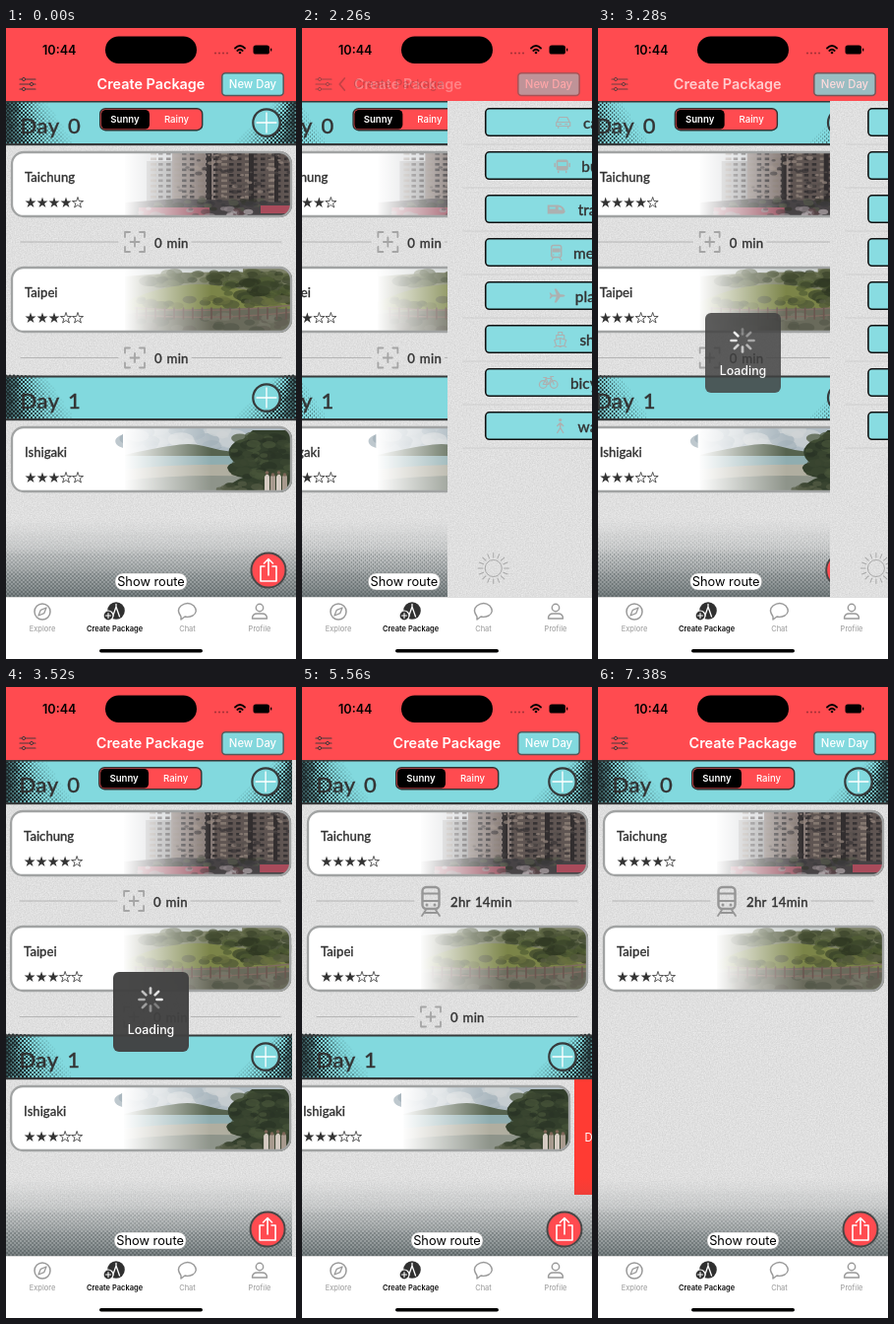
Animation of 295x640 px, one loop 9320 ms. Source, as an HTML page:

```html
<!DOCTYPE html>
<html lang="en">
<meta charset="utf-8">
<title>Trip planner</title>
<style>
html, body { margin: 0; height: 100%; overflow: hidden; background: #fff }
svg { display: block; width: 100vw; height: 100vh }
text { font-family: Inter, sans-serif }
.hand { font-family: Lato, sans-serif; font-weight: 500; fill: #333; stroke: #333; stroke-width: .3 }
.mid { text-anchor: middle }
.line { fill: none; stroke-linecap: round; stroke-linejoin: round }
</style>
<svg id="stage" viewBox="0 0 295 640"></svg>
<script>
const W = 295, LOOP = 9320, TEAL = '#82d9de', RED = '#ff4b50', INK = '#363a3b';
const rep = (n, f) => Array.from({ length: n }, (_, i) => f(i)).join('');
const text = (x, y, size, s, attrs = '') => `<text x="${x}" y="${y}" font-size="${size}" ${attrs}>${s}</text>`;
const rect = (x, y, w, h, fill, attrs = '') => `<rect x="${x}" y="${y}" width="${w}" height="${h}" fill="${fill}" ${attrs}/>`;
const circle = (x, y, r, fill, attrs = '') => `<circle cx="${x}" cy="${y}" r="${r}" fill="${fill}" ${attrs}/>`;
const line = (d, color, width = 1, attrs = '') => `<path class="line" d="${d}" stroke="${color}" stroke-width="${width}" ${attrs}/>`;
const shape = (d, fill) => `<path d="${d}" fill="${fill}"/>`;
const at = (x, y, s, attrs = '') => `<g transform="translate(${x} ${y})" ${attrs}>${s}</g>`;
const random = i => { const v = Math.sin(i * 12.9898) * 43758.5453; return v - Math.floor(v); };

// Staggered dots whose radius follows strength(x, y)
function halftone(h, color, strength) {
  let d = '';
  for (let row = 0; row * 2 <= h; row++)
    for (let x = row % 2 * 2; x <= W; x += 4) {
      const y = row * 2, r = Math.min(1.6, strength(x, y));
      if (r > .25) d += `M${(x - r).toFixed(2)} ${y}a${r.toFixed(2)} ${r.toFixed(2)} 0 1 0 ${(2 * r).toFixed(2)} 0a${r.toFixed(2)} ${r.toFixed(2)} 0 1 0 ${(-2 * r).toFixed(2)} 0`;
    }
  return shape(d, color);
}

// Random soft blotches inside a box, for foliage and facades
const mottle = (n, x, y, w, h, size, colors) => rep(n, i => {
  const a = random(i + x), b = random(i * 1.7 + y + 9), c = random(i * 2.3 + 5);
  return `<ellipse cx="${(x + a * w).toFixed(1)}" cy="${(y + b * h).toFixed(1)}" rx="${(size * (.5 + c)).toFixed(1)}" ry="${(size * (.3 + c * .5)).toFixed(1)}" fill="${colors[i % colors.length]}" opacity=".7"/>`;
});

const paper = rect(0, 74, W, 504, '#dedede', 'filter="url(#grain)"');

const city = rect(116, 0, 170, 67, '#c3c6c9')
  + rect(138, 10, 34, 50, '#8f8f90') + rect(164, 0, 50, 56, '#867a76') + rect(208, 0, 78, 56, '#5f5552')
  + rep(10, r => rep(18, c => rect(142 + c * 8, 1 + r * 5.5, c % 3 ? 4.5 : 6, 2.6, c % 3 ? '#373334' : '#83776f')))
  + shape('M199 0h5v56h-5zM242 0h5v56h-5zM268 0h4v56h-4z', '#322e2f')
  + mottle(70, 170, 2, 116, 46, 2.5, ['#3a3637', '#94877e', '#57504e'])
  + shape('M116 52l54-4 116 4v15H116z', '#474345')
  + mottle(40, 140, 49, 120, 10, 4, ['#35372f', '#54584a', '#3d3b3e'])
  + rect(130, 57, 72, 10, '#9c5563') + mottle(22, 130, 58, 120, 8, 4, ['#8f8589', '#5b4448', '#b2a9ad'])
  + rect(254, 55, 30, 8, '#a94b5b');
const garden = rect(116, 0, 170, 67, '#7d8167')
  + shape('M116 0h120v6q-50-2-120 4z', '#c9cecd')
  + mottle(60, 140, 6, 146, 12, 7, ['#4b5337', '#5d6643', '#3b432c'])
  + shape('M116 36q50-24 100-16t70 6v18H116z', '#7b8448')
  + mottle(40, 216, 14, 70, 22, 7, ['#3a442a', '#515d34', '#2f3823'])
  + mottle(34, 130, 31, 156, 9, 6, ['#4d5636', '#68703f', '#5a5f44'])
  + shape('M116 48q80-8 170-5v24H116z', '#696a5b')
  + mottle(34, 130, 50, 156, 15, 6, ['#55594a', '#777769', '#615f53'])
  + line('M126 42q80 6 160-3M126 49q80 6 160-3', '#806c62', 1.4)
  + rep(17, i => line(`M${128 + i * 9.5} 42v11`, '#6a5750', 1.6));
const beach = rect(116, 0, 170, 67, '#b0bcc4')
  + mottle(30, 120, 2, 110, 18, 11, ['#c5ccd0', '#a3b1ba', '#d0d5d6'])
  + shape('M116 29q30-7 46-9 20-4 34 0t30 6v6H116z', '#56634f')
  + rect(116, 30, 170, 13, '#8fadb0')
  + shape('M116 44q60-8 170-4v27H116z', '#b0aea0')
  + shape('M116 55q60-7 130-4v16H116z', '#8e948a')
  + shape('M214 67q14-13 22-15-14-2-16-10 2-5 8-5-8-6-6-14 6-10 14-10l10-9h40v63z', '#333f2c')
  + mottle(60, 226, 8, 58, 44, 6, ['#2a3425', '#48543a', '#3b4731'])
  + mottle(20, 206, 58, 60, 8, 5, ['#3d4733', '#565d46'])
  + rep(4, i => shape(`M${258 + i * 6} 65v-14q3-5 5 0v14z`, i % 2 ? '#a89a8e' : '#d5cbc2') + circle(260.5 + i * 6, 47 + i % 2 * 2, 1.8, '#7d6557'));

const starPath = 'M' + Array.from({ length: 10 }, (_, i) => {
  const r = i % 2 ? 2.25 : 5.8, a = i * Math.PI / 5;
  return (r * Math.sin(a)).toFixed(2) + ' ' + (-r * Math.cos(a)).toFixed(2);
}).join('L') + 'Z';
const rating = n => rep(5, i => at(20 + i * 12, 52.3,
  `<path d="${starPath}" fill="${i < n ? '#333' : 'none'}" stroke="#333" stroke-width="${i < n ? 0 : .8}"/>`));

const card = (y, name, stars, photo) => at(5, y,
  rect(0, 0, 286, 67, '#fff', 'rx="13"')
  + `<g clip-path="url(#cardClip)">${photo}${rect(114, 0, 90, 67, 'url(#fade)')}</g>`
  + rect(1, 1, 284, 65, 'none', 'rx="12" stroke="#a1a3a3" stroke-width="2.3"')
  + text(14, 30.5, 13.1, name, 'class="hand"') + rating(stars));

const stop = (y, label, icon, lineStart) => at(0, y,
  line(`M15 0H114M${lineStart} 0H280`, '#b4b4b4') + at(131, 0, icon)
  + text(151, 5.5, 13.2, label, 'class="hand" letter-spacing=".25" word-spacing="1"'));
const addIcon = line('M-10-5v-5h5M5-10h5v5M10 5v5H5M-5 10h-5V5M-4.5 0h9M0-4.5v9', '#a5a5a5', 1.8);
const trainIcon = rect(-8.5, -14, 17, 22, 'none', 'rx="4" stroke="#969696" stroke-width="2.4"')
  + line('M-8-7.500H8M-8 0H8', '#969696', 2.2) + circle(-4, 4, 1.5, '#969696') + circle(4, 4, 1.5, '#969696')
  + line('M-5 9l-4 6M5 9l4 6M-7 12H7', '#969696', 1.8);

const dayDots = halftone(42, '#1d292b', (x, y) =>
  1.65 * Math.max(0, 1 - x / (48 + y * .8), 1 - (W - x) / (24 + y * 1.2)));
const day = (y, n) => at(0, y,
  rect(0, 0, W, 45, TEAL) + dayDots + rect(0, -.5, W, 2, INK) + rect(0, 43, W, 2.2, INK)
  + text(14.5, 32.5, 22, 'Day ' + n, 'class="hand" letter-spacing=".5" word-spacing="3"')
  + circle(266, 23, 14.2, '#2b3335', 'opacity=".5"') + circle(265, 22, 13.7, TEAL, `stroke="${INK}" stroke-width="2.2"`)
  + line('M255 22h20M265 12v20', '#fff', 1.3));

const toggle = rect(95.7, 81.7, 104, 22, RED, 'rx="5.5" stroke="#333" stroke-width="1.4"')
  + rect(97, 83, 49, 19.5, '#000', 'rx="4.5"')
  + text(121, 96.3, 9.6, 'Sunny', 'class="mid" fill="#fff" font-weight="600"')
  + text(173.5, 96.3, 9.6, 'Rainy', 'class="mid" fill="#fff" font-weight="500"');

const footer = rect(0, 498, W, 80, 'url(#dusk)')
  + at(0, 508, halftone(69, '#434d4e', (x, y) => .2 + y / 69), 'opacity=".5"')
  + rect(111, 553, 73, 17, '#fff', 'rx="8" stroke="#888" stroke-opacity=".5" stroke-width=".8"')
  + text(147.5, 566, 12.8, 'Show route', 'class="mid"')
  + circle(267, 550, 17.5, RED, 'stroke="#484848" stroke-width="2"')
  + line('M263 546h-4v15h16v-15h-4M267 555v-16M262.5 543l4.5-4.5 4.5 4.5', '#fff', 1.6);

// Transport list: label, icon x, icon
const G = '#adb0b0';
const modes = [
  ['car', 117, line('M-6-1l2-4h8l2 4M-7 0H7v4H-7zM-5 4v2M5 4v2M-4 2h2M2 2h2', G, 1.2)],
  ['bus', 116, rect(-6, -6, 12, 11, G, 'rx="2"') + rect(-4.5, -3.5, 9, 4, TEAL) + line('M-4 6v1M4 6v1M-7.5-2v3M7.5-2v3', G, 1.5)],
  ['train', 110, shape('M-9-4H2q6 1 7 7-1 2-3 2H-9z', G) + shape('M2-2q3 0 4 3H2z', TEAL) + rect(-7, -2, 6, 2, TEAL)],
  ['metro', 110, rect(-5, -7, 10, 12, 'none', `rx="2" stroke="${G}" stroke-width="1.4"`) + rect(-4, -4, 8, 4, G) + line('M-3 5l-2 3M3 5l2 3M-3 2.5h.1M3 2.5h.1', G, 1.3)],
  ['plane', 111, shape('M8 0q-1-1.5-5-1.2L-1-7h-2l2 6h-4l-2-2h-1l1 3-1 3h1l2-2h4l-2 6h2l4-5.8q4 .3 5-1.2z', G)],
  ['ship', 114, line('M-6 1L0-1l6 2-2 6h-8zM-4 0v-4h8v4M-2-4v-3h4v3M0-1v6M-6 8q3-2 6 0 3-2 6 0', G, 1.1)],
  ['bicycle', 102, circle(-5.5, 2, 3.8, 'none', `stroke="${G}" stroke-width="1.2"`) + circle(5.5, 2, 3.8, 'none', `stroke="${G}" stroke-width="1.2"`) + line('M-5.5 2l3-6H3L0 2h-5.5M0 2l-3-7M5.5 2L2-6h3M-5-5h3', G, 1.1)],
  ['walk', 114, circle(0, -6, 1.6, G) + line('M0-3v5l3 5M0 2l-3 5M0-3l-3 3M0-3l3 3', G, 1.4)],
];
const rays = (n, a, b, from = 0, span = 360) => rep(n, i => line(`M0 ${-a}V${-b}`, '#a8a8a8', 1, `transform="rotate(${from + i * span / n})"`));
const list = paper
  + modes.map(([name, x, icon], i) => at(0, 81 + i * 44,
      rect(38, .8, 219, 27.5, '#88dce1', 'rx="4" stroke="#111" stroke-width="1.6"')
      + at(x, 14.5, icon) + text(147.5, 20.5, 15.4, name, 'class="hand mid"')
      + line('M15 37H295', '#c9c9c9', .8))).join('')
  + at(46, 548, circle(0, 0, 8.5, 'none', 'stroke="#a8a8a8"') + rays(16, 11, 15.5))
  + at(240, 543, circle(0, 0, 6, 'none', 'stroke="#a8a8a8"') + rays(9, 8, 11, -110, 220))
  + `<path class="line" d="M234 562q-6-1-6-7t7-6q3-8 11-5 6 3 6 7 4-4 8-1 8 0 7 7-1 5-6 5z" fill="#dedede" stroke="#a8a8a8"/>`;

const main = paper + day(74, 0) + toggle
  + card(125, 'Taichung', 4, city)
  + `<g id="addStop">${stop(217, '0 min', addIcon, 189)}</g><g id="trainStop">${stop(217, '2hr 14min', trainIcon, 217)}</g>`
  + card(242, 'Taipei', 3, garden)
  + `<g id="dayOne">${stop(334.5, '0 min', addIcon, 189)}${day(353, 1)}
     <g id="row">${card(404, 'Ishigaki', 3, beach)}</g>
     <g id="remove">${rect(0, 398, 120, 117, '#ff3b33')}${text(10.5, 461, 11.3, 'Delete', 'fill="#fff"')}</g></g>`
  + footer;

const status = text(37, 26.5, 12.6, '10:44', 'font-weight="600"') + rect(101, 8.5, 93, 27.5, '#000', 'rx="13.7"')
  + rep(4, i => circle(213 + i * 4, 25.5, 1.1, '#a83238'))
  + line('M233 20.5q5-5 10 0M235.3 23q2.7-2.5 5.4 0', '#000', 1.8) + circle(238, 25, 1.3, '#000')
  + rect(251.5, 17.5, 16.5, 9, '#000', 'rx="2.6"') + rect(269, 20.5, 1.3, 3, '#000', 'rx=".6"');

const nav = rect(0, 0, W, 74, RED) + status
  + `<g id="mainNav">${line('M14 52h16M14 57h16M14 62h16', '#46393a', 1.1)}
     ${[[18, 52], [26, 57], [18, 62]].map(([x, y]) => circle(x, y, 1.6, RED, 'stroke="#46393a"')).join('')}
     ${rect(219.8, 45.8, 62.4, 22.8, TEAL, 'rx="3.5" stroke="#56585a" stroke-width="1.5"')}
     ${text(251, 61, 11.3, 'New Day', 'class="mid" fill="#fff" font-weight="500"')}</g>
     <g id="title">${text(147.5, 61.5, 14.4, 'Create Package', 'class="mid" fill="#fff" font-weight="600"')}</g>
     <g id="back">${line('M13 51l-5 6 5 6', '#33282a', 1.7)}${text(22, 61.3, 12.3, 'Create Package', 'fill="#4b2b2e"')}</g>`;

const tabLabel = (x, s, attrs) => text(x, 611.5, 7.5, s, `class="mid" ${attrs}`);
const tabs = rect(0, 577, W, 63, '#fff') + rect(0, 577, W, .7, '#cfcfcf')
  + circle(37, 592, 8, 'none', 'stroke="#999" stroke-width="1.5"') + line('M41 588l-2.3 5.7-5.7 2.3 2.3-5.7z', '#999', 1.3)
  + circle(112, 591, 8.8, '#303030') + line('M108.5 597l3.5-10 3.5 10M112 584.5v2', '#fff', 1.3)
  + circle(104, 596, 5, '#303030', 'stroke="#fff" stroke-width="1.2"') + line('M101.5 596h5M104 593.5v5', '#fff', 1.1)
  + line('M178 597q-5-7 0-11 7-5 13 0 5 6-1 10-4 2-8 1l-4 3z', '#999', 1.4)
  + circle(258, 588, 3.7, 'none', 'stroke="#999" stroke-width="1.4"') + line('M250.5 599q0-5 5-5h5q5 0 5 5z', '#999', 1.4)
  + tabLabel(37, 'Explore', 'fill="#969696"') + tabLabel(110.5, 'Create Package', 'fill="#111" font-weight="600"')
  + tabLabel(184.5, 'Chat', 'fill="#969696"') + tabLabel(258, 'Profile', 'fill="#969696"')
  + rect(95, 630, 105, 3.6, '#000', 'rx="1.8"');

const hud = rect(109, 289, 77, 81, '#414141', 'rx="6" opacity=".96"')
  + at(147, 317, `<g id="spinner">${rep(8, i => line('M0-6.5v-5', '#fff', 2.7, `opacity="${.3 + i * .09}" transform="rotate(${i * 45})"`))}</g>`)
  + text(147.5, 351.5, 12.4, 'Loading', 'class="mid" fill="#fff" font-weight="500"');

const fadeStops = (color, ...stops) => stops.map(([o, a]) => `<stop offset="${o}" stop-color="${color}" stop-opacity="${a}"/>`).join('');
stage.innerHTML = `<defs>
  <filter id="grain" x="0" y="0" width="1" height="1" color-interpolation-filters="sRGB">
    <feTurbulence type="fractalNoise" baseFrequency=".75" numOctaves="2" seed="4"/>
    <feColorMatrix values=".13 0 0 0 .81 .13 0 0 0 .81 .13 0 0 0 .81 0 0 0 0 1"/></filter>
  <clipPath id="cardClip"><rect width="286" height="67" rx="13"/></clipPath>
  <clipPath id="content"><rect y="74" width="295" height="504"/></clipPath>
  <linearGradient id="fade">${fadeStops('#fff', [0, 1], [.3, .7], [1, 0])}</linearGradient>
  <linearGradient id="dusk" x2="0" y2="1">${fadeStops('#586365', [0, 0], [.35, .14], [1, .72])}</linearGradient></defs>
  <g clip-path="url(#content)"><g id="home">${main}</g><g id="list">${list}</g></g>${nav}${tabs}<g id="hud">${hud}</g>`;

const $ = id => document.getElementById(id);
const clamp = v => Math.min(1, Math.max(0, v));
const spring = ms => { const s = Math.max(0, ms) * .015; return 1 - (1 + s) * Math.exp(-s); };
const smooth = v => (v = clamp(v), v * v * (3 - 2 * v));
const shift = (id, x) => $(id).setAttribute('transform', `translate(${x.toFixed(2)} 0)`);
const alpha = (id, a) => { $(id).setAttribute('opacity', a); $(id).style.display = a > 0 ? '' : 'none'; };

function draw(t) {
  const p = t < 4000 ? spring(t - 2150) - spring(t - 3080) : 0;
  shift('home', -88 * p);
  shift('list', W * (1 - p));
  alpha('list', p > 0 ? 1 : 0);
  alpha('mainNav', 1 - p);
  alpha('title', clamp(1 - 1.4 * p));
  shift('title', -80 * p);
  alpha('back', clamp(p * 1.4 - .4));
  shift('back', 60 * (1 - p));

  alpha('hud', clamp(Math.min((t - 3150) / 150, (4180 - t) / 170)));
  $('spinner').setAttribute('transform', `rotate(${Math.floor(t / 100) % 8 * 45})`);
  alpha('addStop', t < 3990 ? 1 : 0);
  alpha('trainStop', t < 3990 ? 0 : 1);

  const swipe = t < 5560 ? 0 : 18 + 38 * smooth((t - 5560) / 900);
  shift('row', -swipe);
  shift('remove', W - swipe);
  alpha('dayOne', t < 7380 ? 1 : 0);
}

const start = performance.now();
function tick() {
  draw((performance.now() - start) % LOOP);
  requestAnimationFrame(tick);
}
tick();
</script>
</html>
```
